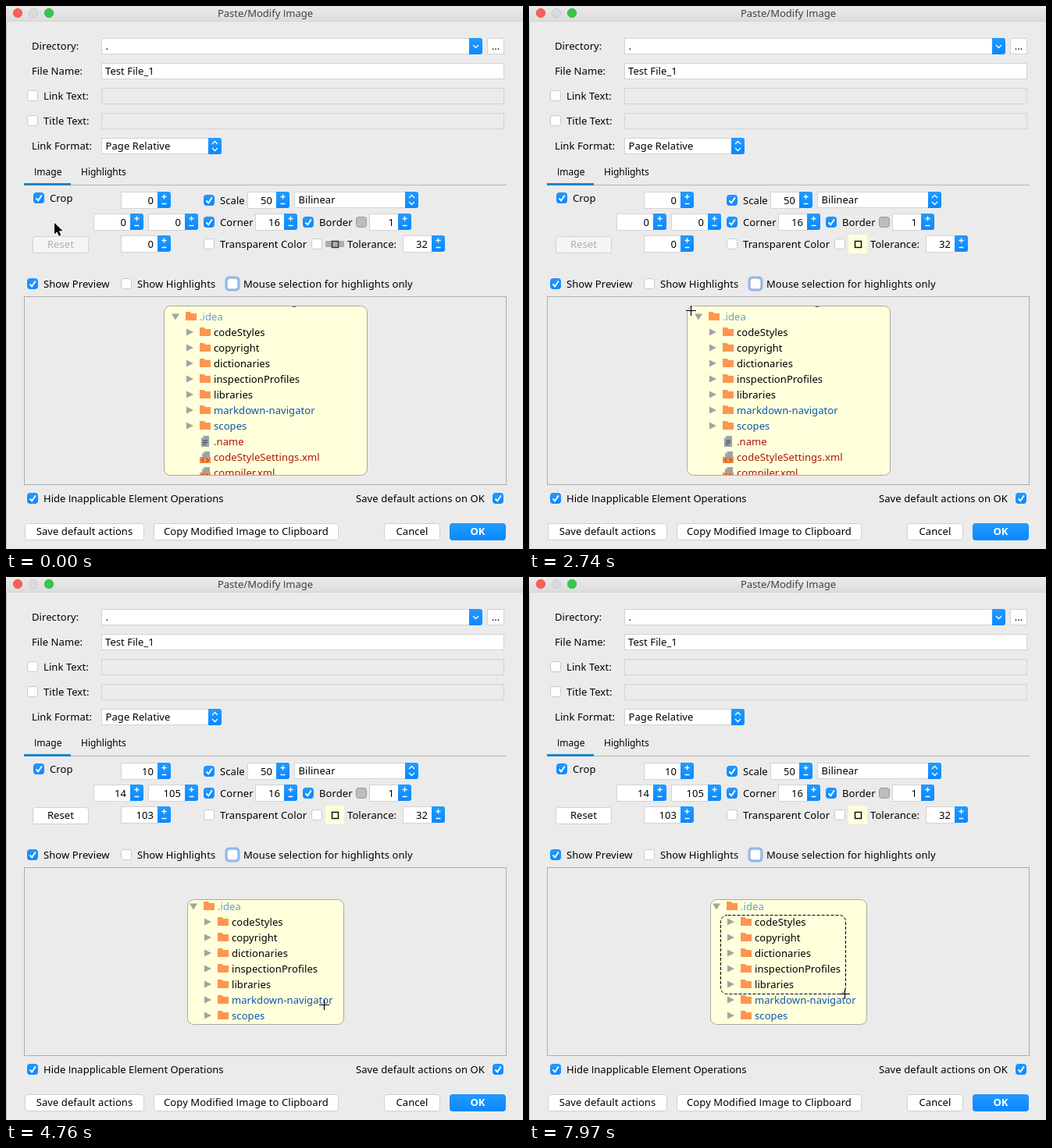
An HTML page that plays this animation: 662x696 px, repeating every 8 s.

```html
<!DOCTYPE html>
<html lang="en">
<head>
<meta charset="utf-8">
<title>Image dialog</title>
<style>
html, body { margin: 0; width: 100%; height: 100%; overflow: hidden; background: #ebebeb; }
svg { display: block; }
text { font: 13px "Noto Sans", "Open Sans", sans-serif; letter-spacing: .08px; fill: #000; white-space: pre; }
.cap { font-family: "Open Sans", sans-serif; }
.tab { font-size: 12px; letter-spacing: 0; }
.title { fill: #404040; letter-spacing: 0; }
.tight { letter-spacing: 0; }
.ok { fill: #fff; font-weight: 600; }
.off rect { fill: #f5f5f5; }
.off text { fill: #adadad; }
.idea { fill: #659fca; }
.changed { fill: #0a55b0; }
.added { fill: #ac1800; }
.white { fill: none; stroke: #fff; stroke-width: 1.3; }
</style>
</head>
<body>
<svg id="stage" width="662" height="696" viewBox="0 0 662 696"></svg>
<script>
const TICK = 119, LOOP = 8000;
const BLUE = 'url(#blue)', PAPER = '#ffffdb', PANEL = '#ebebeb';

const rect = (x, y, w, h, fill, extra = '') =>
  `<rect x="${x}" y="${y}" width="${w}" height="${h}" fill="${fill}" ${extra}/>`;
const path = (d, extra) => `<path d="${d}" ${extra}/>`;

// y is the middle of the capital letters
const text = (x, y, s, extra = '') =>
  `<text x="${x}" y="${y + 5}" ${extra}>${s.replace(/I/g, '<tspan class="cap">I</tspan>')}</text>`;
const centered = (x, y, s, cls = '') => text(x, y, s, `text-anchor="middle" class="${cls}"`);

const box = (x, y, w, h, fill = '#fff', stroke = '#d3d3d3', r = 0) =>
  rect(x + .5, y + .5, w - 1, h - 1, fill, `stroke="${stroke}" rx="${r}"`);

const check = (x, y, on, label = '', labelX = x + 14, cls = '') =>
  box(x - 7, y - 7, 14, 14, on ? BLUE : '#fff', on ? '#1a8cfa' : '#c8c8c8', 3) +
  (on ? path(`M${x - 3.5} ${y + .5}l2.7 3 4.6-7`, 'fill="none" stroke="#fff" stroke-width="1.9"') : '') +
  text(labelX, y, label, `class="${cls}"`);

const blueEnd = (x, top, d) =>
  path(`M${x} ${top}h14q3 0 3 3v15q0 3-3 3h-14z`, `fill="${BLUE}"`) + path(d, 'class="white"');

const spinner = (x, y, w, value, id = '') => {
  const b = x + w - 17, c = b + 8.5;
  return box(x, y - 11, w - 16, 22) +
    text(b - 5, y, value, `text-anchor="end" ${id && `id="${id}"`}`) +
    blueEnd(b, y - 11, `M${c - 3} ${y - 4.5}h6m-3-3v6M${c - 3} ${y + 4.5}h6`);
};

const combo = (x, y, w, label, single) => {
  const b = x + w - 17, c = b + 8.5;
  const arrows = single
    ? `M${c - 3.5} ${y - 1}l3.5 3.5 3.5-3.5`
    : `M${c - 3.5} ${y - 2}l3.5-3.5 3.5 3.5M${c - 3.5} ${y + 3}l3.5 3.5 3.5-3.5`;
  return box(x, y - 10, w - 16, 21) + text(x + 5.5, y, label) + blueEnd(b, y - 10, arrows);
};

const button = (x, y, w, label, cls = '') =>
  box(x, y, w, 22, cls === 'ok' ? BLUE : '#fff', cls === 'ok' ? '#1a8cfa' : '#d0d0d0', 3) +
  centered(x + w / 2, y + 10, label, cls);

const folder = (x, y) => path(`M${x} ${y - 6}h5.5l2 2h6.5v9h-14z`, 'fill="#fd9650"');
const page = (x, y) => path(`M${x + 3} ${y - 7}h7v14h-10v-11z`, 'fill="#9aa3aa"') +
  path(`M${x} ${y - 4}h3v-3z`, 'fill="#c9ced2"');

function treeRow(name, i) {
  const y = 418 + 20 * i, isFolder = i < 7;
  const cls = isFolder ? (i > 4 ? 'changed' : '') : 'added';
  let icon;
  if (isFolder) icon = path(`M231 ${y - 4.5}l9 4.5-9 4.5z`, 'fill="#a3a3a3"') + folder(248, y);
  else if (i === 7) icon = page(250, y) + path(`M252 ${y - 1}h6m-6 2.5h6m-6 2.5h4`, 'stroke="#38424a"');
  else icon = page(251, y) + rect(248, y, 14, 8, '#f28a4c') +
    path(`M253.5 ${y + 1.5}l-3 2.5 3 2.5m3-5l3 2.5-3 2.5`, 'fill="none" stroke="#6b3518"');
  return icon + text(266, y, name, `class="${cls}"`);
}

const rows = ['codeStyles', 'copyright', 'dictionaries', 'inspectionProfiles', 'libraries',
  'markdown-navigator', 'scopes', '.name', 'codeStyleSettings.xml', 'compiler.xml'];

const gradient = (id, a, b) => `<linearGradient id="${id}" x2="0" y2="1">
  <stop stop-color="${a}"/><stop offset="1" stop-color="${b}"/></linearGradient>`;

const light = (x, fill, stroke) => `<circle cx="${x}" cy="9" r="5.7" fill="${fill}" stroke="${stroke}" stroke-width=".7"/>`;

document.getElementById('stage').innerHTML = [
  `<defs>${gradient('blue', '#229aff', '#0a88ff')}${gradient('bar', '#ebebeb', '#dcdcdc')}
   <clipPath id="clip"><rect class="image" rx="8"/></clipPath></defs>`,
  rect(0, 0, 662, 696, PANEL), rect(0, 0, 662, 19, 'url(#bar)'), rect(0, 19, 662, 1, '#d4d4d4'),
  rect(0, 20, 1, 676, '#c4c4c4'),
  light(15, '#fc5f5a', '#e0443e'), light(35, '#dadada', '#c3c3c3'), light(55, '#35c84a', '#22a833'),
  centered(332, 9, 'Paste/Modify Image', 'title'),

  text(33, 51, 'Directory:'), combo(122, 51, 488, '.', true), box(616, 41, 22, 21), centered(627, 51, '...'),
  text(33, 83, 'File Name:'), box(122, 73, 516, 21), text(127, 83, 'Test File_1'),
  check(34, 115, false, 'Link Text:'), box(122, 105, 516, 21, PANEL),
  check(34, 147, false, 'Title Text:'), box(122, 137, 516, 21, PANEL),
  text(33, 179, 'Link Format:'), combo(122, 179, 154, 'Page Relative'),

  text(36, 212, 'Image', 'class="tab"'), text(96, 212, 'Highlights', 'class="tab"'),
  rect(23, 229, 618, 1, '#b5b5b5'), rect(23, 227, 60, 3, '#1c86c8'),

  check(42, 246, true, 'Crop'),
  spinner(147, 249, 64, '0', 'top'), spinner(112, 277, 64, '0', 'left'),
  spinner(182, 277, 64, '0', 'right'), spinner(147, 305, 64, '0', 'bottom'),
  `<g id="reset">${button(34, 295, 72, 'Reset')}</g>`,
  check(260, 249, true, 'Scale'), spinner(309, 249, 54, '50'), combo(369, 248, 159, 'Bilinear'),
  check(260, 277, true, 'Corner'), spinner(319, 277, 54, '16'),
  check(387, 277, true, 'Border'), box(448, 270, 14, 14, '#bdbdbd', '#999', 3), spinner(465, 277, 54, '1'),
  check(260, 305, false, 'Transparent Color'), check(398, 305, false),
  rect(409, 293, 24, 24, '#adadad', 'id="picker"'),
  rect(417.5, 301.5, 8, 8, 'none', 'id="pickerMark" stroke="#111" stroke-width="1.4"'),
  text(437, 305, 'Tolerance:'), spinner(508, 305, 54, '32'),

  check(34, 356, true, 'Show Preview'), check(154, 356, false, 'Show Highlights'),
  rect(280.5, 346.5, 19, 19, '#8fb8f3', 'rx="5"'),
  check(290, 356, false, 'Mouse selection for highlights only'),

  box(23, 372, 618, 242, PANEL, '#adadad'),
  `<rect class="image" rx="8" fill="${PAPER}"/>
   <g clip-path="url(#clip)"><g id="tree">`,
  `<ellipse cx="369" cy="384" rx="3" ry="2" fill="#555"/>`,
  path('M212 394.5h10l-5 8z', 'fill="#a3a3a3"'), folder(230, 398), text(248, 398, '.idea', 'class="idea"'),
  rows.map(treeRow).join(''),
  `</g></g><rect class="image" rx="8" fill="none" stroke="#a9a9a0"/>`,

  check(34, 631, true, 'Hide Inapplicable Element Operations', 48, 'tight'),
  check(630, 631, true, 'Save default actions on OK', 448),
  button(24, 663, 153, 'Save default actions'),
  button(189, 663, 237, 'Copy Modified Image to Clipboard'),
  button(484, 663, 72, 'Cancel'), button(568, 663, 72, 'OK', 'ok'),

  `<rect id="selection" rx="8" fill="none" stroke="#000" stroke-dasharray="4 2"/>
   <g id="cross">${path('M-6 .5h13M.5-6v13', 'stroke="#fff" stroke-width="2.6" opacity=".6"')}
   ${path('M-6 .5h13M.5-6v13', 'stroke="#000" stroke-width="1.2"')}</g>`,
  path('M0 0V14.5l3.4-3.2 2.4 5.5 2.5-1.1-2.4-5.4h4.7z',
    'id="arrow" stroke="#fff" stroke-width="1.2" paint-order="stroke"')
].join('');

// Pointer route: tick, x, y, eased
const route = [
  [0, 62, 278], [2, 85, 335], [4, 128, 406], [5, 165, 421], [7, 214, 411], [8, 215, 397],
  [10, 220, 400], [12, 215, 409], [13, 215, 409], [15, 208, 391], [17, 208, 391], [18, 207, 391],
  [22, 207, 391], [23, 207, 390], [24, 207, 390], [30, 406, 548, 1], [31, 407, 548], [45, 407, 548],
  [51, 245, 433, 1], [56, 245, 433], [57, 243, 433], [60, 243, 433], [66, 404, 537, 1], [67, 404, 534]
];

function pointerAt(tick) {
  const i = route.findIndex(key => key[0] >= tick);
  if (i < 1) return route[i < 0 ? route.length - 1 : 0].slice(1, 3);
  const [t0, x0, y0] = route[i - 1], [t1, x1, y1, eased] = route[i];
  let k = (tick - t0) / (t1 - t0);
  if (eased) k = k * k * (3 - 2 * k);
  return [Math.round(x0 + (x1 - x0) * k), Math.round(y0 + (y1 - y0) * k)];
}

const el = id => document.getElementById(id);
const set = (node, attrs) => { for (const name in attrs) node.setAttribute(name, attrs[name]); };
const show = (id, on) => set(el(id), { display: on ? 'inline' : 'none' });

function render(ms) {
  const tick = Math.floor((ms + 10) / TICK);
  const [x, y] = pointerAt(tick);
  const cropped = tick >= 40, inPanel = y > 373;

  const image = cropped
    ? { x: 232.5, y: 413.5, width: 200, height: 160 }
    : { x: 202.5, y: 384.5, width: 260, height: 217 };
  document.querySelectorAll('.image').forEach(node => set(node, image));
  set(el('tree'), { transform: cropped ? 'translate(23 24)' : '' });

  const crop = cropped ? [10, 14, 105, 103] : [0, 0, 0, 0];
  ['top', 'left', 'right', 'bottom'].forEach((id, i) => el(id).textContent = crop[i]);
  set(el('reset'), { class: cropped ? '' : 'off' });

  const overImage = x > 203 && y > 384;
  const overArrow = !cropped && Math.hypot(x - 217, y - 397) < 4;
  const color = !inPanel || overArrow ? '#adadad' : overImage ? PAPER : PANEL;
  set(el('picker'), { y: inPanel ? 293 : 301, height: inPanel ? 24 : 8, fill: color });
  set(el('pickerMark'), { stroke: inPanel && !overArrow ? '#000' : '#333' });

  const dragging = tick >= 25 && tick < 40 || tick >= 61;
  show('selection', dragging);
  if (dragging) {
    const [left, top] = cropped ? [245.5, 433.5] : [209.5, 389.5];
    set(el('selection'), {
      x: left, y: top,
      width: Math.max(1, x + 1.5 - left), height: Math.max(1, y + .5 - top),
      'stroke-dashoffset': -tick % 6
    });
  }

  show('cross', inPanel);
  show('arrow', !inPanel);
  set(el(inPanel ? 'cross' : 'arrow'), { transform: `translate(${x} ${y})` });
}

function loop() {
  render(performance.now() % LOOP);
  requestAnimationFrame(loop);
}
loop();
</script>
</body>
</html>
```
